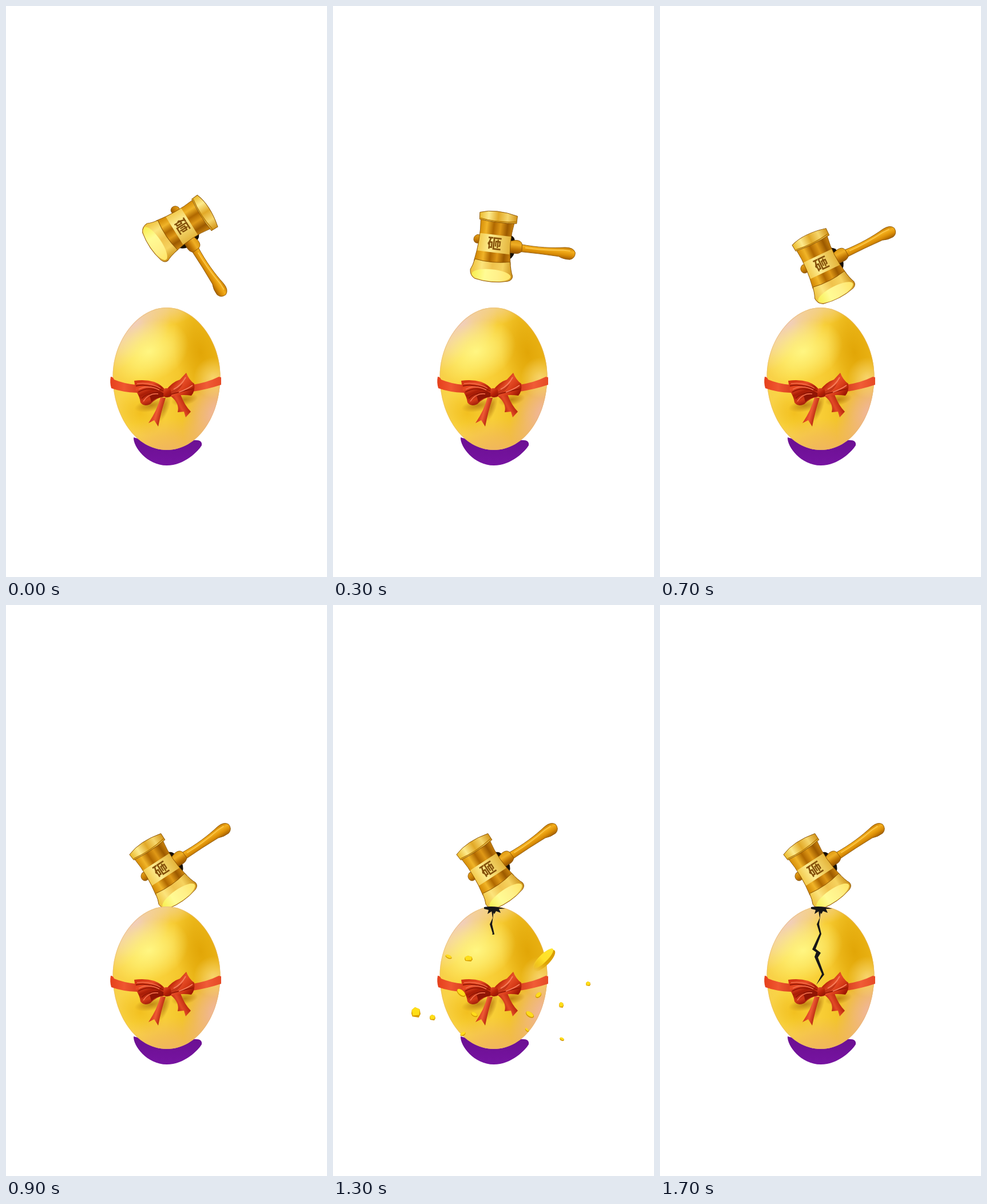
Animation, 561 px wide and 998 px high, one loop 1.8 s. Source, as an HTML page with a canvas:

```html
<!DOCTYPE html>
<html lang="zh">
<head>
<meta charset="utf-8">
<title>Golden egg</title>
<style>
html, body { margin: 0; width: 100%; height: 100%; overflow: hidden; background: #fff; }
canvas { display: block; }
</style>
</head>
<body>
<canvas id="stage" width="561" height="998"></canvas>
<script>
const ctx = document.getElementById('stage').getContext('2d');
const LOOP = 1800, STEP = 100;

function fill(d, style) {
  ctx.fillStyle = style;
  ctx.fill(new Path2D(d));
}

function stroke(d, style, width) {
  ctx.strokeStyle = style;
  ctx.lineWidth = width;
  ctx.stroke(new Path2D(d));
}

function linear(x0, y0, x1, y1, ...colors) {
  const g = ctx.createLinearGradient(x0, y0, x1, y1);
  colors.forEach((c, i) => g.addColorStop(i / (colors.length - 1), c));
  return g;
}

function ellipse(x, y, rx, ry, angle, style) {
  ctx.fillStyle = style;
  ctx.beginPath();
  ctx.ellipse(x, y, rx, ry, angle, 0, Math.PI * 2);
  ctx.fill();
}

// Soft elliptical spot of colour, rgb given as "r,g,b".
function glow(x, y, rx, ry, rgb, alpha, angle = 0) {
  ctx.save();
  ctx.translate(x, y);
  ctx.rotate(angle);
  ctx.scale(rx, ry);
  const g = ctx.createRadialGradient(0, 0, 0, 0, 0, 1);
  g.addColorStop(0, `rgba(${rgb},${alpha})`);
  g.addColorStop(0.5, `rgba(${rgb},${alpha * 0.55})`);
  g.addColorStop(1, `rgba(${rgb},0)`);
  ellipse(0, 0, 1, 1, 0, g);
  ctx.restore();
}

const EGG = 'M281 527 C331 527 374.500 585 374.500 647 C374.500 717 335 776 281 776 C227 776 186.500 717 186.500 647 C186.500 585 231 527 281 527Z';

function drawEgg() {
  fill('M223 754 C222 770 246 803 281 803 C312 803 336 778 342 768 Q344 757 326 759 L281 770Z',
    linear(0, 760, 0, 800, '#6c1093', '#7613a0'));
  ctx.save();
  ctx.clip(new Path2D(EGG));
  ctx.fillStyle = linear(186, 0, 375, 0, '#f8d04a', '#fbd840', '#f8ce36', '#f0bf22', '#efb91c');
  ctx.fillRect(180, 520, 200, 260);
  glow(340, 606, 46, 84, '222,160,0', 0.8, -0.2);
  glow(278, 522, 58, 36, '242,208,150', 0.9);
  glow(222, 552, 68, 62, '240,205,196', 1, -0.7);
  glow(200, 580, 38, 62, '243,208,182', 0.8, 0.4);
  glow(250, 604, 72, 52, '255,246,130', 1, -0.4);
  glow(235, 712, 45, 38, '236,176,10', 0.6, 0.5);
  glow(285, 782, 115, 62, '240,180,96', 1);
  glow(368, 712, 56, 84, '241,182,164', 1, 0.35);
  glow(362, 650, 34, 36, '251,220,120', 0.8);
  stroke(EGG, 'rgba(226,176,120,.45)', 2);
  ctx.restore();
}

function drawBow() {
  fill('M183 648 Q187 648 189 653 Q206 660 227 662 L229 676 Q203 675 184 668 Q181 658 183 648Z',
    linear(183, 0, 230, 0, '#e6411c', '#ef5630', '#d83f1e'));
  fill('M326 662 Q352 658 372 648 L376 649 L376 662 Q352 670 326 674Z',
    linear(326, 0, 376, 0, '#d8401e', '#f05c36', '#e64a26'));
  glow(254, 698, 30, 11, '150,80,0', 0.55, -0.2);
  glow(276, 702, 9, 26, '150,80,0', 0.5, 0.35);
  glow(312, 688, 24, 10, '150,80,0', 0.55, -0.2);

  fill('M270 684 Q265 705 249 729 L259 724 L266 735 Q271 709 279 685Z',
    linear(254, 702, 276, 708, '#c92c10', '#ef5a34', '#a91c06'));
  fill('M288 682 Q304 695 300 710 L311 709 L314 719 L323 709 Q312 698 305 679Z',
    linear(294, 705, 316, 694, '#a91d06', '#e24a26', '#b52309'));
  fill('M224 655 Q243 652 259 657 Q272 662 278 671 L276 683 Q262 685 252 696 Q241 701 235 693 Q234 683 227 673Z',
    linear(240, 653, 258, 697, '#d23413', '#e94c24', '#a81c06', '#d23a18', '#8f1404'));
  fill('M280 671 Q291 657 304 653 L315 641 Q320 654 329 660 Q331 673 324 681 Q304 678 284 684Z',
    linear(290, 658, 320, 682, '#b72207', '#e85029', '#d63a17', '#a01804'));

  // Folds and their highlights.
  fill('M250 677 Q265 671 277 677 L276 683 Q262 684 254 692Z', '#8f1505');
  fill('M283 676 Q298 670 309 660 Q304 673 285 682Z', '#94160566');
  stroke('M227 664 Q250 659 275 673 M231 675 Q250 663 273 676 M237 686 Q250 672 272 679', '#981805', 2);
  stroke('M229 660 Q252 657 270 668 M232 670 Q248 661 268 671 M240 691 Q250 676 266 678', '#f57450', 1.4);
  stroke('M287 679 Q308 673 327 669', '#981805', 1.8);
  stroke('M293 670 Q306 664 314 649 M302 675 Q316 670 326 663', '#f7805c', 1.8);
  fill('M276 669 Q282 666 288 671 L289 681 Q282 687 275 682Z',
    linear(275, 668, 288, 685, '#e8522c', '#b82208', '#861103'));
}

function drawHammer(x, y, degrees) {
  ctx.save();
  ctx.translate(x, y);
  ctx.rotate(degrees * Math.PI / 180);
  ctx.lineJoin = 'round';
  const edge = '#8a5200';

  fill('M24 -21 Q33 -19 34 -10 L36 8 Q33 21 25 23Z', '#171006');

  const knob = 'M-24 -14 L-32 -15 Q-39 -12 -38 -5 Q-36 1 -30 0 L-24 0Z';
  fill(knob, linear(0, -15, 0, 1, '#e3a01a', '#cc8206', '#945400'));
  stroke(knob, edge, 0.8);

  const handle = 'M44 -7 C75 -5 100 -7 122 -11 Q137 -13 141 -4 Q142 6 133 9 Q122 10 113 6 Q80 5 44 6Z';
  fill(handle, linear(0, -11, 0, 9, '#cc8206', '#f3ae1c', '#db8e06', '#a56000'));
  stroke(handle, edge, 0.8);
  stroke('M53 -2 Q85 -1 119 -6 L132 -6', '#fbc545', 2);

  const collar = 'M25 -10 L35 -13 Q45 -14 47 -7 L48 5 Q43 11 35 10 L25 10Z';
  fill(collar, linear(0, -13, 0, 11, '#dd9a14', '#efae24', '#c27703', '#8d4f00'));
  stroke(collar, edge, 0.8);

  const body = 'M-30 -42 Q-26 -8 -33 31 L31 31 Q23 -8 29 -42Z';
  fill(body, linear(-30, 0, 30, 0, '#d48b06', '#f0b428', '#b06800', '#df9816', '#9c5a00', '#cf870e'));
  fill('M-28.500 -18 Q-28 -3 -29.500 13 L27.500 13 Q26 -3 26.500 -18Z',
    linear(-28, 0, 28, 0, '#f3cb50', '#fdec90', '#f0cf62', '#e3b238'));
  stroke(body, edge, 0.8);

  const top = 'M-33 -54 Q-6 -64 33 -55 L33 -42 Q0 -38 -32 -42Z';
  fill(top, linear(-33, 0, 33, 0, '#eab82a', '#fdea8c', '#e2a928', '#f6d66c', '#d2941a'));
  stroke(top, edge, 0.9);
  stroke('M-31 -44 Q0 -39 32 -45', '#b87a06', 1.5);

  const cap = 'M-32 28 Q0 33 30 26 Q33 42 37 50 Q38 57 30 60 Q2 68 -28 62 Q-37 58 -37.500 47 Q-34 40 -32 28Z';
  fill(cap, linear(-37, 0, 37, 0, '#eec03a', '#fce47c', '#f0c24c', '#f6d25e', '#cb8f18'));
  ellipse(0, 53, 34, 10.5, -0.03, linear(-34, 0, 34, 0, '#f7ee50', '#fffb94', '#fff08a', '#ffe566'));
  stroke(cap, edge, 0.9);

  ctx.fillStyle = '#84500a';
  ctx.font = '900 25px "Noto Sans CJK SC", "Noto Sans CJK JP", "Noto Sans CJK", sans-serif';
  ctx.textAlign = 'center';
  ctx.textBaseline = 'middle';
  ctx.fillText('砸', -1, -3);
  ctx.restore();
}

// Time, centre x, centre y, angle.
const SWING = [
  [0, 306, 387, 58],
  [300, 283, 418, 7],
  [500, 282.5, 436, -11],
  [700, 284, 452.5, -25.5],
  [900, 273, 463.5, -33]
];

function swingAt(t) {
  const i = SWING.findIndex(k => k[0] > t);
  if (i < 0) return SWING[SWING.length - 1].slice(1);
  const a = SWING[i - 1], b = SWING[i];
  const p = (t - a[0]) / (b[0] - a[0]);
  return [1, 2, 3].map(n => a[n] + (b[n] - a[n]) * p);
}

const CRACK = 'M277 534 L279 547 L274 558 L279 574 L266 602 L273 607 L270 615 L283 645 L273 664 L287 646 L276 616 L281 608 L272 601 L282 575 L278 558 L281 535Z';

function drawCrack(t) {
  if (t < 1000) return;
  const tips = [540, 540, 555, 576, 602, 616, 645, 666];
  ctx.save();
  ctx.beginPath();
  ctx.rect(255, 520, 60, tips[(t - 1000) / STEP] - 520);
  ctx.clip();
  fill('M264 528 Q282 525 301 531 L290 531 L293 538 L285 535 L282 540 L278 535 L270 540 L272 533 L264 531Z', '#171717');
  fill(CRACK, '#171717');
  ctx.restore();
}

// Resting x, y, half length, half width, tilt; a zero tilt is an angular chip.
const BITS = [
  [145, 712, 8, 9, 0], [174, 721, 5, 5, 0], [237, 618, 7, 5, 0],
  [399, 699, 4, 5, 0], [446, 662, 4, 4, 0], [202, 614, 6, 3, 0.4],
  [224, 677, 9, 5, 0.7], [247, 715, 6, 3.5, 0.5], [227, 749, 5, 3, -0.5],
  [359, 681, 6, 4, -0.7], [344, 715, 8, 4.5, 0.6], [339, 742, 4, 2, 0.8],
  [400, 758, 4, 2.5, 0.5]
];

function drawChip(x, y, w, h) {
  ctx.save();
  ctx.translate(x, y);
  ctx.scale(w, h);
  fill('M-.9 -.5 L-.2 -1 L.8 -.6 L1 .3 L.6 1 L-.8 .8 L-1 .2Z', '#d99c00');
  fill('M-.9 -.5 L-.2 -1 L.8 -.6 L.7 .5 L-.7 .6Z', '#ffdf18');
  ctx.restore();
}

function drawBits(t) {
  if (t < 1100 || t > 1400) return;
  const k = (t - 1300) / 100;
  const place = (x, y) => [280 + (x - 280) * (1 + 0.09 * k), y + 70 * k];
  for (const [x0, y0, w, h, tilt] of BITS) {
    const [x, y] = place(x0, y0);
    if (!tilt) drawChip(x, y, w, h);
    else {
      ellipse(x, y + 1, w, h, tilt, '#d49a00');
      ellipse(x, y, w * 0.9, h * 0.8, tilt, '#ffdc1c');
    }
  }
  const [x, y] = place(368, 620);
  ctx.save();
  ctx.translate(x, y);
  ctx.rotate(-0.78);
  ellipse(0, 2, 25, 9, 0, linear(-25, 0, 25, 0, 'rgba(226,166,0,0)', '#dda300', '#d99b00'));
  ellipse(1, -2, 24, 7, 0, linear(-24, 0, 24, 0, 'rgba(255,224,30,0)', '#ffe129', '#ffe52e'));
  ctx.restore();
}

function draw(now) {
  const t = Math.floor((now % LOOP) / STEP) * STEP;
  ctx.fillStyle = '#fff';
  ctx.fillRect(0, 0, 561, 998);
  drawHammer(...swingAt(t));
  drawEgg();
  drawCrack(t);
  drawBow();
  drawBits(t);
}

const start = performance.now();
function tick() {
  draw(performance.now() - start);
  requestAnimationFrame(tick);
}
tick();
</script>
</body>
</html>
```
